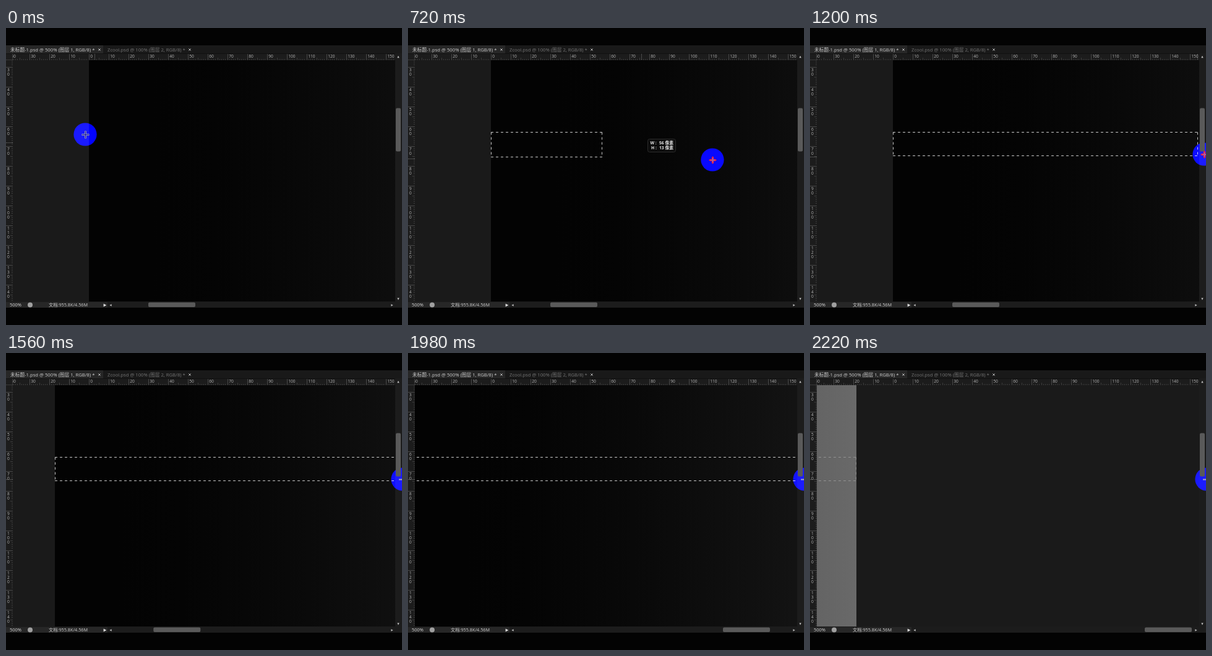
An HTML page with a canvas for the animation above (2280 ms loop, 640x480 px).

```html
<!DOCTYPE html>
<html>
<head>
<meta charset="utf-8">
<style>
html, body { margin: 0; height: 100%; overflow: hidden; background: #030303; }
canvas { display: block; width: 640px; height: 480px; }
</style>
</head>
<body>
<canvas id="stage" width="640" height="480"></canvas>
<script>
const g = document.getElementById('stage').getContext('2d');
const LOOP = 2280, STEP = 60;
const FACE = '"Open Sans", "Noto Sans CJK SC", "Noto Sans CJK", sans-serif';
const VIEW = { left: 11, top: 52, right: 629, bottom: 442 };
const ORIGIN = 134, CANVAS_W = 2048, UNIT = 3.2;
const RELEASE = 1140;

// Each row: time, then the values at that time
const cursorPath = [
  [0, 128, 172], [90, 134, 169], [230, 185, 194], [320, 213, 199], [480, 321, 209],
  [565, 380, 211], [720, 492, 213], [840, 568, 215], [960, 612, 211],
  [1080, 633, 206], [1200, 637, 204], [1380, 641, 204]
];
const scrollPath = [[1380, 0], [1560, 55], [1740, 128], [1980, 145]];
const thumbPath = [[1380, 0], [1560, 8.3], [1980, 279], [2040, 311]];
const END_SCROLL = ORIGIN + CANVAS_W - 75;

function at(path, t) {
  if (t <= path[0][0]) return path[0].slice(1);
  for (let i = 1; i < path.length; i++) {
    const a = path[i - 1], b = path[i];
    if (t <= b[0]) {
      const k = (t - a[0]) / (b[0] - a[0]);
      return a.slice(1).map((v, j) => v + (b[j + 1] - v) * k);
    }
  }
  return path[path.length - 1].slice(1);
}

function box(x, y, w, h, color) {
  g.fillStyle = color;
  g.fillRect(x, y, w, h);
}

function text(str, x, y, size, color, align = 'left', weight = 400) {
  g.font = `${weight} ${size}px ${FACE}`;
  g.textAlign = align;
  g.fillStyle = color;
  g.fillText(str, x, y);
}

function line(x1, y1, x2, y2, color, width = 1) {
  g.strokeStyle = color;
  g.lineWidth = width;
  g.beginPath();
  g.moveTo(x1, y1);
  g.lineTo(x2, y2);
  g.stroke();
}

function triangle(x, y, r, angle, color) {
  g.save();
  g.translate(x, y);
  g.rotate(angle);
  g.fillStyle = color;
  g.beginPath();
  g.moveTo(r, 0);
  g.lineTo(-r, -r);
  g.lineTo(-r, r);
  g.fill();
  g.restore();
}

function roundBox(x, y, w, h, r, fill, stroke) {
  g.beginPath();
  g.roundRect(x, y, w, h, r);
  g.fillStyle = fill;
  g.fill();
  if (stroke) {
    g.strokeStyle = stroke;
    g.lineWidth = 1;
    g.stroke();
  }
}

function disc(x, y, r, color) {
  g.fillStyle = color;
  g.beginPath();
  g.arc(x, y, r, 0, 7);
  g.fill();
}

function cross(x, y, r, color, width) {
  line(x - r, y, x + r, y, color, width);
  line(x, y - r, x, y + r, color, width);
}

function page(scroll) {
  const left = ORIGIN - scroll;
  const shade = g.createLinearGradient(left, 0, left + CANVAS_W, 0);
  for (let i = 0; i <= 20; i++) {
    const v = Math.max(3, Math.round(105 * Math.pow(i / 20, 1.45)));
    shade.addColorStop(i / 20, `rgb(${v},${v},${v})`);
  }
  box(VIEW.left, VIEW.top, VIEW.right - VIEW.left, VIEW.bottom - VIEW.top, '#1a1a1a');
  box(left, VIEW.top, CANVAS_W, VIEW.bottom - VIEW.top, shade);
}

function selection(t, scroll) {
  if (t < 540) return;
  let [right, bottom] = at(cursorPath, t - 250);
  if (t >= RELEASE) {
    right = scroll > 0 ? ORIGIN + CANVAS_W - scroll : 627;
    bottom = 206.5;
  }
  const left = ORIGIN - scroll, top = 168.5;
  const x1 = Math.max(left, VIEW.left + 3), x2 = Math.min(right, VIEW.right);
  const color = scroll === END_SCROLL ? '#929292' : '#c8c8c8';
  const snap = v => Math.floor(v) + 0.5;
  bottom = snap(bottom);
  g.setLineDash([4, 4]);
  line(x1, top, x2, top, color);
  line(x1, bottom, x2, bottom, color);
  if (left > VIEW.left) line(snap(left), top, snap(left), bottom, color);
  if (right < VIEW.right) line(snap(right - 1), top, snap(right - 1), bottom, color);
  g.setLineDash([]);
}

function tooltip(t, mx, my) {
  if (t < 300 || t >= RELEASE) return;
  const [sx, sy] = at(cursorPath, t - 250);
  const x = Math.round(mx + 10), y = Math.round(my - 32);
  const w = Math.round((sx - ORIGIN) / UNIT), h = Math.ceil((sy - 168.5) / UNIT);
  roundBox(x + 0.5, y + 0.5, 45, 21, 3, '#0c0c0c', '#2b2b2b');
  [['W :', w, 4.5], ['H :', h, 6]].forEach(([label, n, dx], i) => {
    const ty = y + 7.5 + i * 8;
    text(label, x + dx, ty, 6.8, '#e4e4e4', 'left', 700);
    text(n + ' 像素', x + 42, ty, 6.8, '#e4e4e4', 'right', 700);
  });
}

function rulers(mx, my) {
  box(0, 41, 640, 11, '#1c1c1c');
  box(0, 41, VIEW.left, 401, '#1c1c1c');
  line(0, 41.5, 640, 41.5, '#111');

  g.save();
  g.beginPath();
  g.rect(VIEW.left, 41, VIEW.right - VIEW.left, 11);
  g.clip();
  for (let i = -40; i <= 156; i++) {
    const x = Math.floor(ORIGIN + i * UNIT) + 0.5;
    line(x, i % 10 ? (i % 5 ? 50 : 48) : 42, x, 52, i % 10 ? '#3c3c3c' : '#484848');
    if (i % 10 === 0) text(Math.abs(i), x + 1.7, 46, 6.6, '#b4b4b4');
  }
  g.restore();

  g.save();
  g.beginPath();
  g.rect(0, VIEW.top, VIEW.left, VIEW.bottom - VIEW.top);
  g.clip();
  for (let i = 26; i <= 150; i++) {
    const y = Math.floor(63 + (i - 30) * UNIT) + 0.5;
    line(i % 10 ? (i % 5 ? 9 : 7) : 0, y, 11, y, i % 10 ? '#3c3c3c' : '#484848');
    if (i % 10 === 0) {
      [...String(i)].forEach((d, k) => text(d, 4, y + 5 + k * 7, 6.6, '#b4b4b4', 'center'));
    }
  }
  g.restore();

  mx = Math.round(mx) + 0.5;
  my = Math.round(my) + 0.5;
  g.setLineDash([1, 1]);
  if (mx < VIEW.right) line(mx, 42, mx, 52, '#777');
  line(0, my, 11, my, '#777');
  line(0, 51.5, 11, 51.5, '#555');
  line(10.5, 42, 10.5, 52, '#555');
  g.setLineDash([]);
}

function frameBars(thumb) {
  box(0, 28, 640, 13, '#191919');
  box(0, 28, 157, 13, '#272727');
  text('未标题-1.psd @ 500% (图层 1, RGB/8) *', 7, 35.5, 7.7, '#cecece');
  text('Zcool.psd @ 100% (图层 2, RGB/8) *', 164, 35.5, 7.7, '#747474');
  for (const x of [151, 297]) {
    line(x - 1.7, 33.3, x + 1.7, 36.7, '#bbb');
    line(x - 1.7, 36.7, x + 1.7, 33.3, '#bbb');
  }

  box(629, 41, 11, 411, '#1c1c1c');
  triangle(634, 46.5, 1.7, -Math.PI / 2, '#bbb');
  triangle(634, 438, 1.7, Math.PI / 2, '#bbb');

  box(0, 442, 640, 10, '#1c1c1c');
  box(0, 443, 164, 9, '#272727');
  text('500%', 6, 447.8, 7.5, '#d8d8d8');
  disc(39, 447.5, 4, '#a0a0a0');
  text('文档:955.8K/4.56M', 69, 447.8, 7.25, '#d0d0d0');
  triangle(160, 448, 2.4, 0, '#ddd');
  triangle(169, 448, 1.7, Math.PI, '#bbb');
  triangle(624, 448, 1.7, 0, '#bbb');
  roundBox(230 + thumb, 443.5, 76, 7.5, 2, '#5a5a5a');
}

function highlight(x, y) {
  g.globalCompositeOperation = 'lighten';
  disc(x, y, 18.6, '#0000ff');
  g.globalCompositeOperation = 'source-over';
}

function pointer(t, x, y) {
  x = Math.round(x) + 0.5;
  y = Math.round(y) + 0.5;
  if (t < 180) {
    cross(x, y, 6, '#9a9ab4', 3);
    cross(x, y, 5.5, '#1010b0', 1);
  } else if (t < 1380) {
    cross(x, y, 5, '#ff2038', 3);
    for (let k = 0; k < 4; k++) {
      const a = k * Math.PI / 2;
      triangle(x + 4.5 * Math.cos(a), y + 4.5 * Math.sin(a), 2, a, '#ff2038');
    }
    cross(x, y, 3.5, '#8078d0', 1);
  } else {
    line(635, 204.5, 640, 204.5, '#a8a8c0', 2);
  }
}

function draw(t) {
  const [cx, cy] = at(cursorPath, t);
  const [mx, my] = t < 240 ? [143, 185] : at(cursorPath, t - 160);
  const scroll = t >= 2040 ? END_SCROLL : at(scrollPath, t)[0];

  box(0, 0, 640, 480, '#030303');
  g.textBaseline = 'middle';
  g.save();
  g.beginPath();
  g.rect(VIEW.left, VIEW.top, VIEW.right - VIEW.left, VIEW.bottom - VIEW.top);
  g.clip();
  page(scroll);
  selection(t, scroll);
  tooltip(t, mx, my);
  g.restore();
  rulers(mx, my);
  frameBars(at(thumbPath, t)[0]);
  highlight(cx, cy);
  roundBox(630, 129.5, 8, 70, 2, '#5a5a5a');
  pointer(t, cx, cy);
}

const start = performance.now();
function tick() {
  const t = (performance.now() - start) % LOOP;
  draw(Math.floor(t / STEP) * STEP);
  requestAnimationFrame(tick);
}
tick();
</script>
</body>
</html>
```
